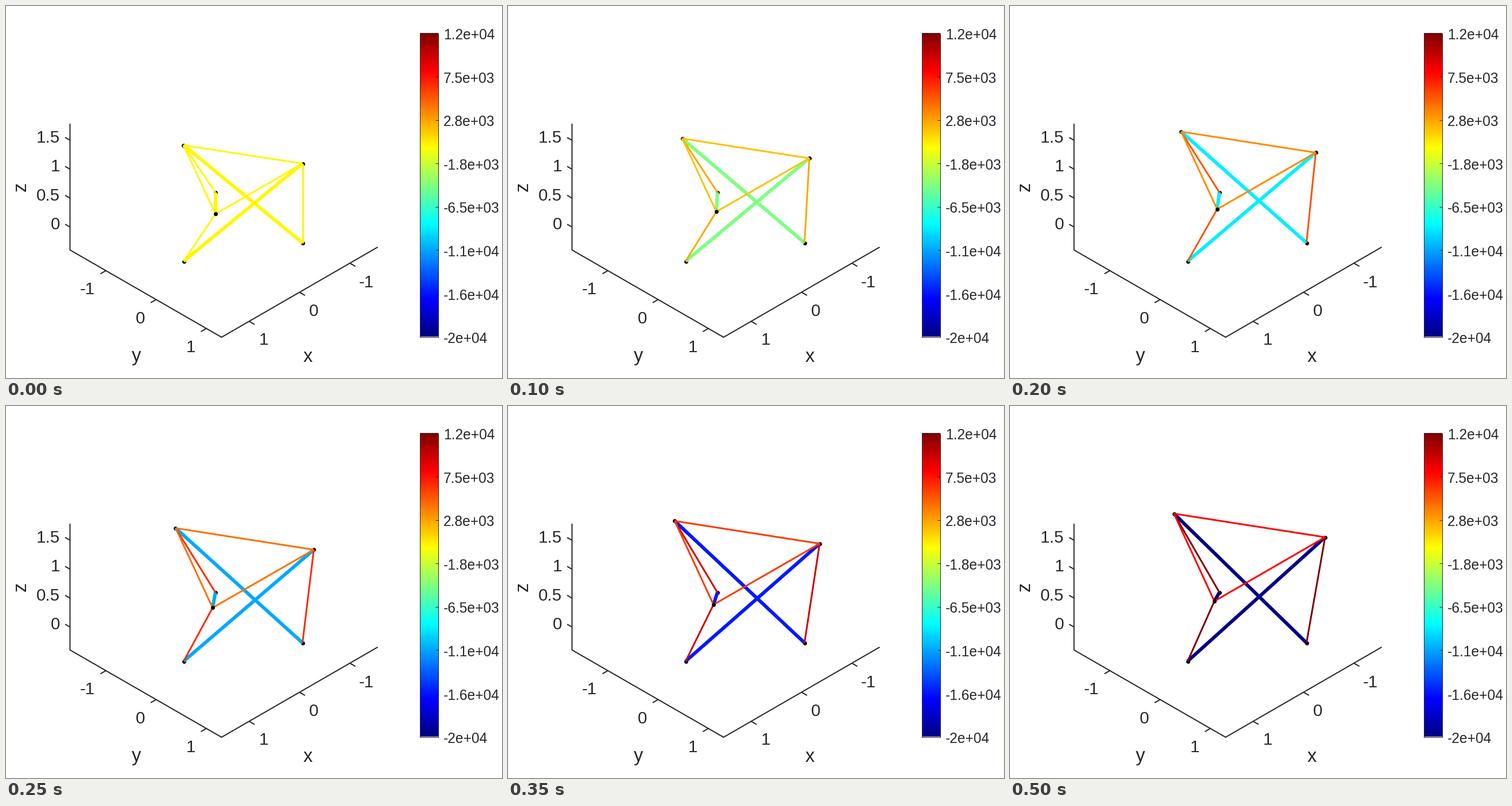
A matplotlib script that plays this animation: 864 by 648 pixels, repeating every 1 s.

```python
import numpy as np
import matplotlib.pyplot as plt
from matplotlib.animation import FuncAnimation

W, H, DPI = 864, 648, 72          # at 72 dpi one point is one pixel
INK = "#262626"
LOAD_STEPS = 9
LEVELS = 256

plt.rcParams["font.family"] = "Liberation Sans"
plt.rcParams["axes.unicode_minus"] = False


def jet(level):
    """Classic 256-level jet ramp, level 0..255 to RGB."""
    ramp = lambda centre: np.clip((96 - abs(level - centre)) / 64, 0, 1)
    return ramp(191), ramp(127), ramp(63)


# Joints as (x, y) polynomials in the load step: constant, linear, quadratic.
JOINTS = {
    "A": ((309.3, -2.95, 0.035), (242.5, -5.75, -0.04)),
    "B": ((516.5, 4.35, -0.083), (274.5, -4.5, -0.067)),
    "C": ((364.8, -0.98, 0), (362.2, -1.75, -0.08)),
    "D": ((364.8, 0, 0), (324.8, 0, 0)),
    "E": ((309.5, 0, 0), (444.5, 0, 0)),
    "F": ((516.5, 0, 0), (412.5, 0, 0)),
}

# Member groups: joint pairs, line width, colour level as a polynomial.
GROUPS = [
    (("AF", "BE", "DC"), 6, (161, -17.2, -0.075)),
    (("AD", "CE", "BF"), 3, (161, 10, 0.05)),
    (("AB", "AC", "BC"), 3, (161, 6.8, 0)),
]


def poly(coef, s):
    return coef[0] + coef[1] * s + coef[2] * s * s


fig = plt.figure(figsize=(W / DPI, H / DPI), dpi=DPI, facecolor="white")
ax = fig.add_axes([0, 0, 1, 1])
ax.axis("off")


def stroke(xs, ys, width=2.0, color=INK, z=1):
    return ax.plot(xs, ys, color=color, lw=width, zorder=z,
                   solid_capstyle="butt", solid_joinstyle="miter")[0]


def label(x, y, text, size=29.5, ha="center"):
    """Text whose digits are vertically centred on y."""
    ax.text(x, y + 0.355 * size, text, size=size, color=INK,
            ha=ha, va="baseline")


def draw_axes():
    stroke([111.5, 111.5, 375.5, 647.5], [205, 425, 577, 420])
    for i, text in enumerate(["0", "0.5", "1", "1.5"]):
        y = 385 - 50.4 * i
        stroke([111.5, 103], [y, y - 4.8])
        label(94, y - 6.3, text, ha="right")
    for i, text in enumerate(["-1", "0", "1"]):
        x, y = 174 + 87.5 * i, 461 + 50.4 * i
        stroke([x, x - 9.5], [y, y + 5.4])
        label((142, 234, 322)[i], 492 + 50.3 * i, text)
    for i, text in enumerate(["1", "0", "-1"]):
        x, y = 423.5 + 87.8 * i, 549.3 - 50.6 * i
        stroke([x, x + 9.5], [y, y + 5.4])
        label((449, 536, 628)[i], 580 - 50.2 * i, text)
    for x, name in ((227, "y"), (526, "x")):
        ax.text(x, 619.5, name, size=32.5, color=INK, ha="center",
                va="baseline")
    ax.text(26, 314.5, "z", size=32.5, color=INK, rotation=90,
            ha="center", va="center")


def draw_colorbar():
    left, right, top, bottom = 720.5, 752.5, 47.5, 576.5
    strip = np.array([[jet(i)] for i in range(LEVELS)])
    ax.imshow(strip, extent=(left, right, bottom, top), origin="lower",
              aspect="auto", interpolation="nearest")
    stroke([left, right, right, left, left],
           [top, top, bottom, bottom, top], 1, z=3)
    names = ["1.2e+04", "7.5e+03", "2.8e+03", "-1.8e+03",
             "-6.5e+03", "-1.1e+04", "-1.6e+04", "-2e+04"]
    for y, text in zip(np.linspace(top, bottom, len(names)), names):
        stroke([right - 5, right], [y, y], 1, z=3)
        label(762, y + 2, text, 24.5, "left")


draw_axes()
draw_colorbar()
ax.set_xlim(0, W)
ax.set_ylim(H, 0)

dots = {name: ax.plot([], [], "o", color="black", ms=7, mew=0,
                      zorder=8 if name == "C" else 4)[0]
        for name in JOINTS}
members = [(pair, stroke([], [], width, z=5 + (width < 5)), level)
           for pairs, width, level in GROUPS for pair in pairs]


def update(frame):
    s = min(frame, LOAD_STEPS)
    place = {n: (poly(px, s), poly(py, s)) for n, (px, py) in JOINTS.items()}
    for name, dot in dots.items():
        dot.set_data([place[name][0]], [place[name][1]])
    for (a, b), line, level in members:
        line.set_data(*zip(place[a], place[b]))
        line.set_color(jet(np.clip(poly(level, s), 0, LEVELS - 1)))
    return [*dots.values(), *(line for _, line, _ in members)]


anim = FuncAnimation(fig, update, frames=20, interval=50, repeat=True,
                     repeat_delay=0, init_func=lambda: update(0))
plt.show()
```
